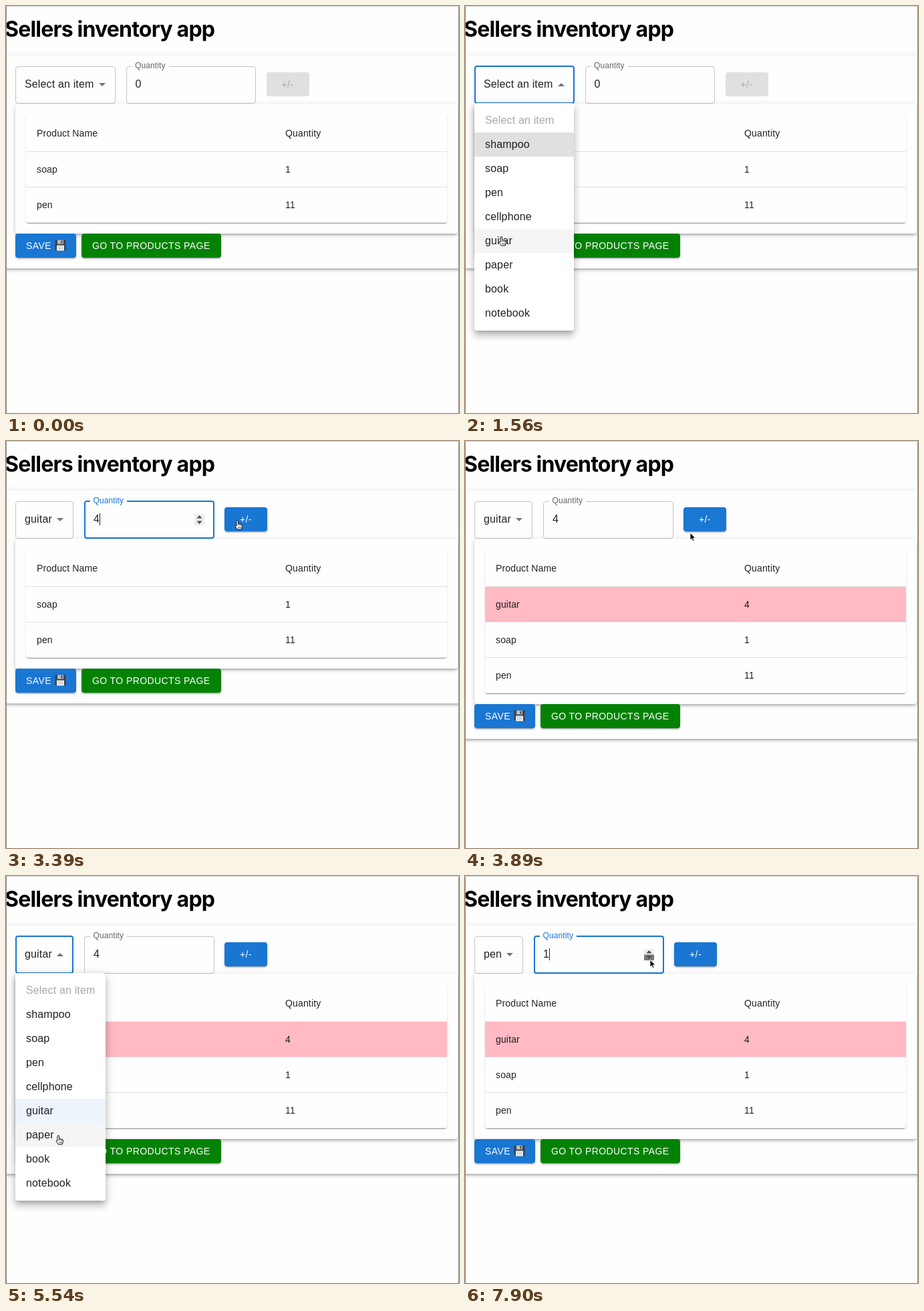
An HTML page for the animation above (7.99 s loop, 678 by 608 pixels).

```html
<!DOCTYPE html>
<html lang="en">
<head>
<meta charset="utf-8">
<title>Inventory</title>
<style>
html, body { margin: 0; width: 100%; height: 100%; overflow: hidden; background: #fefefe; }
#stage { position: relative; width: 678px; height: 608px; overflow: hidden; background: #fefefe;
  font: 16px "Liberation Sans", Arial, sans-serif; letter-spacing: .15px; color: rgba(0,0,0,.87); }
#stage div, #stage svg, h1 { position: absolute; box-sizing: border-box; white-space: pre; }
h1 { left: -2px; top: 14.5px; margin: 0; height: 40px; color: #000; letter-spacing: -.8px;
  font: 700 32px/40px Inter, "Open Sans", sans-serif; font-optical-sizing: none; }
.paper { background: #fefefe; border-radius: 4px;
  box-shadow: 0 3px 3px -2px rgba(0,0,0,.2), 0 3px 4px rgba(0,0,0,.14), 0 1px 8px rgba(0,0,0,.12); }
#outer { left: -4px; top: 74px; width: 686px; }
#inner { left: 14px; top: 146px; width: 662px; }
#table { left: 30px; top: 162px; width: 630px; overflow: hidden; }
#table.paper { box-shadow: 0 2px 1px -1px rgba(0,0,0,.2), 0 1px 1px rgba(0,0,0,.14), 0 1px 3px rgba(0,0,0,.12); }
.row { left: 0; width: 630px; height: 53px; border-bottom: 1px solid #e0e0e0; font-size: 14px; line-height: 52px; }
.row.head { top: 0; height: 56px; line-height: 56px; }
.row.new { background: #ffbac4; }
.row div { left: 16px; }
.row div + div { left: 388px; }
.btn { height: 36px; border-radius: 4px; padding-left: 16px; background: #1976d2; color: #fff;
  font-size: 14px; line-height: 36px; letter-spacing: .4px;
  box-shadow: 0 3px 1px -2px rgba(0,0,0,.2), 0 2px 2px rgba(0,0,0,.14), 0 1px 5px rgba(0,0,0,.12); }
#save { left: 14px; width: 91px; }
#go { left: 113px; width: 209px; background: #058205; }
#add { top: 99px; width: 64px; padding: 0; text-align: center; overflow: hidden; }
#add.off { background: #e0e0e0; color: #a6a6a6; box-shadow: none; }
.field { top: 90px; height: 56px; border-radius: 4px; border: 1px solid #c4c4c4; }
.field.hover { border-color: #212121; }
.field.focus { border: 2px solid #1976d2; top: 89px; height: 57px; }
.value { top: 99px; line-height: 36px; }
#label { top: 82px; padding: 0 5px; background: #fefefe; color: #666; font-size: 12px; line-height: 14px; letter-spacing: .11px; }
#label.focus { color: #1976d2; }
#caret { top: 108px; width: 1px; height: 18px; background: #222; }
#menu { left: 14px; top: 145px; height: 340px; border-radius: 4px; background: #fff;
  box-shadow: 0 5px 5px -3px rgba(0,0,0,.2), 0 8px 10px 1px rgba(0,0,0,.14), 0 3px 14px 2px rgba(0,0,0,.12); }
.item { left: 0; width: 100%; height: 36px; padding-left: 16px; line-height: 36px; overflow: hidden; }
.item:first-child { color: rgba(0,0,0,.34); }
.ripple { border-radius: 50%; background: currentColor; }
.edge { background: #8c8c8c; top: 0; width: 1px; height: 608px; }
</style>
</head>
<body>
<div id="stage">
  <h1>Sellers inventory app</h1>
  <div id="outer" class="paper"></div>
  <div id="select" class="field"></div>
  <div id="choice" class="value" style="left:28px"></div>
  <svg id="drop" width="10" height="5" style="top:115px"><path id="dropPath" fill="#757575"/></svg>
  <div id="qty" class="field"></div>
  <div id="label">Quantity</div>
  <div id="amount" class="value"></div>
  <div id="caret"></div>
  <svg id="spin" width="15" height="17" style="top:109px">
    <rect width="15" height="17" fill="#ececec"/>
    <rect id="spinUp" width="15" height="8.5" fill="#777"/>
    <rect id="spinDown" y="8.5" width="15" height="8.5" fill="#777"/>
    <path d="M3.5 6.5L7.5 2L11.5 6.5Z M3.5 10.5L7.5 15L11.5 10.5Z" fill="#4d4d4d"/>
  </svg>
  <div id="add" class="btn">+/-</div>
  <div id="inner" class="paper"></div>
  <div id="table" class="paper"></div>
  <div id="save" class="btn">SAVE
    <svg width="17" height="17" viewBox="0 0 17 17" style="left:59px;top:9px">
      <path d="M1 .5H16.5V16.5H2.5L.5 14.5V1Z" fill="#3d4248"/>
      <path d="M4 .5H13V6.5H4Z" fill="#b9bec3"/>
      <path d="M9.5 1.5H11.5V5.5H9.5Z" fill="#3d4248"/>
      <path d="M3 8.5H14V16.5H3Z" fill="#eceef0"/>
      <path d="M4.5 11H12.5M4.5 13.5H12.5" stroke="#b5babf"/>
    </svg>
  </div>
  <div id="go" class="btn">GO TO PRODUCTS PAGE</div>
  <div id="menu"></div>
  <svg id="cursor" width="20" height="22" viewBox="-5 -3 20 22" stroke-linejoin="round">
    <path id="arrow" d="M0 0V11L2.5 8.8L4.2 12.6L6 11.8L4.4 8.1H7.8Z" fill="#000" stroke="#fff" stroke-width=".9"/>
    <g id="hand" fill="#fff" stroke="#111">
      <path d="M-1 1Q-1 -.5 .3 -.5T1.6 1V5Q2.8 4 3.8 5.2Q5 4.5 5.8 5.7Q7.3 5.2 7.4 7V9.5L6 13H.3L-2.8 8.5Q-3 6.8 -1.6 7.2L-1 8Z"/>
      <path d="M1.6 5V7.5M3.8 5.2V7.5M5.8 5.7V7.8M1.7 9V11.5M3.6 9V11.5M5.4 9V11.5" stroke-width=".7"/>
    </g>
    <path id="beam" d="M-2 -2Q0 -2 0 0V10Q0 12 -2 12M2 -2Q0 -2 0 0M0 10Q0 12 2 12" fill="none" stroke="#222"/>
  </svg>
  <div class="edge" style="left:0"></div>
  <div class="edge" style="left:677px"></div>
  <div style="left:0;top:0;width:678px;height:1px;background:#d0d0d0"></div>
</div>
<script>
const LOOP = 7990;
const ITEMS = ['Select an item', 'shampoo', 'soap', 'pen', 'cellphone', 'guitar', 'paper', 'book', 'notebook'];
const GUITAR = 5, PEN = 3;
// Layout of the form for each chosen item.
const FORM = { 0: { w: 149.5, q: 179.5 }, [GUITAR]: { w: 87, q: 117 }, [PEN]: { w: 73, q: 103 } };

// Cursor stops: time, x, y.
const PATH = [
  [100, 695, 250], [600, 93, 129], [900, 93, 129], [1500, 54, 345], [1710, 54, 345],
  [1940, 355, 129], [2020, 355, 129], [2420, 289, 113], [3220, 289, 113], [3390, 346, 119],
  [3720, 346, 119], [4150, 320, 170], [4560, 84, 136], [4650, 71, 129], [4840, 71, 129],
  [5500, 78, 390], [5820, 80, 350], [6400, 76, 281], [6590, 76, 281], [6670, 141, 241],
  [7300, 277, 125], [LOOP, 277, 125]
];
const AMOUNTS = [[0, 0], [2710, 1], [2810, 2], [2960, 3], [3090, 4], [7480, 3], [7690, 2], [7850, 1]];

const $ = id => document.getElementById(id);
const clamp = v => Math.max(0, Math.min(1, v));
const between = (t, a, b) => t >= a && t < b;
const inside = (p, x, y, w, h) => between(p.x, x, x + w) && between(p.y, y, y + h);
const show = (el, on) => { el.style.display = on ? '' : 'none'; };

function add(parent, cls, text = '') {
  const el = document.createElement('div');
  el.className = cls;
  el.textContent = text;
  return parent.appendChild(el);
}

function addRow(cls, name, count) {
  const row = add($('table'), 'row ' + cls);
  add(row, '', name);
  add(row, '', count);
  return row;
}

addRow('head', 'Product Name', 'Quantity');
const rows = [addRow('new', 'guitar', '4'), addRow('', 'soap', '1'), addRow('', 'pen', '11')];
const items = ITEMS.map((name, i) => {
  const el = add($('menu'), 'item', name);
  el.style.top = 8 + 36 * i + 'px';
  return el;
});

function addRipple(parent, x, y, start) {
  return { el: add(parent, 'ripple'), x, y, start };
}
const ripples = [
  addRipple(items[GUITAR], 40, 12, 1620),
  addRipple(items[PEN], 62, 22, 6570),
  addRipple($('add'), 19, 20, 3500)
];

function drawRipple({ el, x, y, start }, t) {
  const age = t - start, r = 23 * clamp(age / 100) + clamp((age - 100) / 300) * 50;
  show(el, between(age, 0, 400));
  el.style.cssText += `;left:${x - r}px;top:${y - r}px;width:${2 * r}px;height:${2 * r}px;` +
    `opacity:${.16 * clamp((400 - age) / 250)}`;
}

function cursorAt(t) {
  if (t < PATH[0][0]) return { x: 695, y: 250 };
  const i = Math.max(1, PATH.findIndex(k => k[0] > t));
  const [t0, x0, y0] = PATH[i - 1], [t1, x1, y1] = PATH[i];
  const u = clamp((t - t0) / (t1 - t0)), e = u * u * (3 - 2 * u);
  return { x: x0 + (x1 - x0) * e, y: y0 + (y1 - y0) * e };
}

function menuAlpha(t) {
  return t < 4000 ? clamp((t - 670) / 118) * clamp(1 - (t - 1700) / 160)
                  : clamp((t - 4800) / 118) * clamp(1 - (t - 6630) / 160);
}

function itemColor(i, chosen, hovered) {
  if (i && i === chosen) return `rgba(25,118,210,${hovered ? .12 : .08})`;
  if (i === 1 && !chosen) return 'rgba(0,0,0,.12)';
  return i && hovered ? 'rgba(0,0,0,.04)' : 'transparent';
}

function setField(id, x, w, focus, hover) {
  const el = $(id);
  el.className = 'field' + (focus ? ' focus' : hover ? ' hover' : '');
  el.style.left = x + 'px';
  el.style.width = w + 'px';
}

function drawForm(t, p, chosen, alpha) {
  const { w, q } = FORM[chosen];
  const open = between(t, 650, 1700) || between(t, 4790, 6600);
  const overSelect = inside(p, 14, 90, w, 56);
  const overQty = !alpha && inside(p, q, 90, 194, 56);
  const overSpin = overQty && inside(p, q + 163, 107, 19, 22);
  const overAdd = chosen && inside(p, q + 210, 99, 64, 36);
  const qtyFocus = between(t, 2710, 3510) || t >= 7480;
  const selectFocus = between(t, 650, 2710) || between(t, 4790, 7480);

  setField('select', 14, w, selectFocus, overSelect);
  setField('qty', q, 194.5, qtyFocus, overQty);
  $('choice').textContent = ITEMS[chosen];
  $('drop').style.left = 8.5 + w - 19.5 + 'px';
  $('dropPath').setAttribute('d', open ? 'M0 5L5 0L10 5Z' : 'M0 0L5 5L10 0Z');

  $('label').className = qtyFocus ? 'focus' : '';
  $('label').style.left = q + 8.5 + 'px';
  const step = AMOUNTS.filter(a => a[0] <= t).pop();
  $('amount').textContent = step[1];
  $('amount').style.left = q + 14 + 'px';
  $('caret').style.left = q + 23 + 'px';
  show($('caret'), qtyFocus);

  const pressed = step[0] && t - step[0] < 90 + (t > 7850) * 90;
  show($('spin'), qtyFocus || overQty);
  $('spin').style.left = q + 165 + 'px';
  show($('spinUp'), pressed && t < 4000);
  show($('spinDown'), pressed && t > 4000);

  $('add').className = chosen ? 'btn' : 'btn off';
  $('add').style.left = q + 210 + 'px';

  const overMenu = alpha && inside(p, 14, 145, chosen ? 135 : 149, 340);
  const hand = overMenu || overSelect || (overAdd && !between(t, 1800, 2030));
  return hand ? 'hand' : overQty && !overSpin ? 'beam' : 'arrow';
}

function drawTable(added) {
  const extra = added ? 53 : 0;
  show(rows[0], added);
  rows.forEach((row, i) => { row.style.top = 56 + 53 * (added ? i : i - 1) + 'px'; });
  $('table').style.height = 162 + extra + 'px';
  $('inner').style.height = 194 + extra + 'px';
  $('outer').style.height = 318 + extra + 'px';
  $('save').style.top = $('go').style.top = 340 + extra + 'px';
}

function drawMenu(t, p, chosen, alpha) {
  const width = t < 4000 ? 149 : 135;
  $('menu').style.width = width + 'px';
  $('menu').style.opacity = alpha;
  show($('menu'), alpha > 0);
  const over = between(p.x, 14, 14 + width) ? Math.floor((p.y - 153) / 36) : -1;
  items.forEach((el, i) => { el.style.backgroundColor = itemColor(i, chosen, i === over); });
}

function render(t) {
  const p = cursorAt(t);
  const chosen = t < 1700 ? 0 : t < 6600 ? GUITAR : PEN;
  const alpha = menuAlpha(t);
  const kind = drawForm(t, p, chosen, alpha);
  drawTable(t >= 3750);
  drawMenu(t, p, chosen, alpha);
  ripples.forEach(r => drawRipple(r, t));
  for (const id of ['arrow', 'hand', 'beam']) show($(id), id === kind);
  $('cursor').style.left = p.x - 5 + 'px';
  $('cursor').style.top = p.y - 3 + 'px';
}

function tick() {
  render(performance.now() % LOOP);
  requestAnimationFrame(tick);
}
tick();
</script>
</body>
</html>
```
